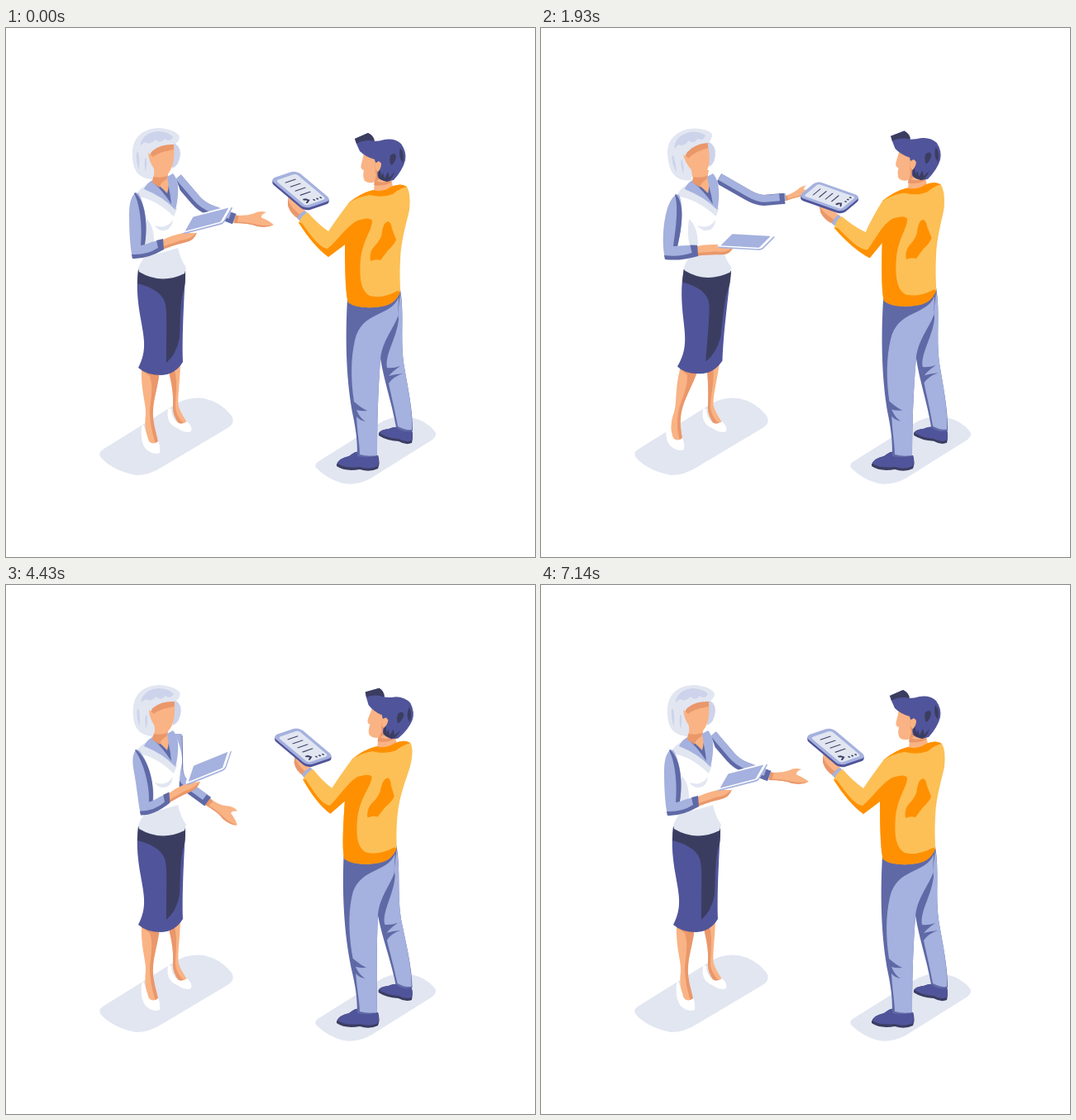
Recreate the animation shown at these times as an HTML page with a canvas. Size 640 by 640 pixels, loop 7210 ms.

```html
<!DOCTYPE html>
<html lang="en">
<head>
<meta charset="utf-8">
<title>Handing over a tablet</title>
<style>
  html, body { margin: 0; width: 100%; height: 100%; overflow: hidden; background: #fff; }
  canvas { display: block; width: 640px; height: 640px; }
</style>
</head>
<body>
<canvas id="stage"></canvas>
<script>
const LOOP = 7210, FRAMES = 101;
const indigo = '#50549a', navy = '#3b3d60', mid = '#5f69a6', lavender = '#a5b1de', pale = '#e1e6f1',
  mist = '#cdd3ea', skin = '#f9b384', blush = '#ea976a', gold = '#fcc056', orange = '#ff9002', white = '#fff';

const canvas = document.getElementById('stage'), ctx = canvas.getContext('2d');
const ratio = window.devicePixelRatio || 1;
canvas.width = canvas.height = 640 * ratio;

/* ---------- helpers ---------- */

const clamp = (v) => Math.min(1, Math.max(0, v));
const mix = (a, b, k) => a + (b - a) * k;
// Linear from a to b while v runs from lo to hi, constant outside.
const span = (v, lo, hi, a, b) => mix(a, b, clamp((v - lo) / (hi - lo)));
const ramp = (t, from, to) => { const s = clamp((t - from) / (to - from)); return s * s * (3 - 2 * s); };
const bump = (t, from, peak, to) => ramp(t, from, peak) - ramp(t, peak, to);
// Smooth blend through three values at k = -1, 0 and 1.
const through = (low, rest, high, k) => rest + k * (high - low) / 2 + k * k * ((high + low) / 2 - rest);

// Moves every point of a path by shift(x, y) => [dx, dy].
const bend = (path, shift) => path.replace(/([\d.]+) ([\d.]+)/g, (_, x, y) => {
  const [dx, dy] = shift(+x, +y);
  return (+x + dx).toFixed(2) + ' ' + (+y + dy).toFixed(2);
});

function paint(color, path, shift) {
  ctx.fillStyle = color;
  ctx.fill(new Path2D(shift ? bend(path, shift) : path));
}

function within(change, draw) {
  ctx.save(); change(); draw(); ctx.restore();
}

function turned(x, y, dx, dy, degrees, draw) {
  within(() => {
    ctx.translate(x + dx, y + dy);
    ctx.rotate(degrees * Math.PI / 180);
    ctx.translate(-x, -y);
  }, draw);
}

// Maps a 100 x 60 plane to the corners a (origin), b (end of x), c (opposite a).
function onPlane([ax, ay, bx, by, cx, cy], ox, oy, draw) {
  within(() => ctx.transform((bx - ax) / 100, (by - ay) / 100, (cx - bx) / 60, (cy - by) / 60, ax + ox, ay + oy), draw);
}

function roundBox(color, x, y, w, h, r) {
  ctx.fillStyle = color;
  ctx.beginPath();
  ctx.roundRect(x, y, w, h, r);
  ctx.fill();
}

/* ---------- woman ---------- */

function strokeLimb(color, width, dx, dy, [sx, sy, ex, ey, wx, wy]) {
  const nx = mix(sx, ex, .75), ny = mix(sy, ey, .75), fx = mix(ex, wx, .3), fy = mix(ey, wy, .3);
  within(() => ctx.translate(dx, dy), () => {
    ctx.strokeStyle = color;
    ctx.lineWidth = width;
    ctx.stroke(new Path2D(`M${sx} ${sy}L${nx} ${ny}Q${ex} ${ey} ${fx} ${fy}L${wx} ${wy}`));
  });
}

// reach: -1 hanging low, 0 open palm, 1 stretched out
function drawReach(reach, lean) {
  const ex = through(208, 237, 265, reach), ey = through(236, 217, 209, reach);
  const wx = through(244, 276, 296, reach), wy = through(262, 231, 204, reach);
  const tx = through(281, 324, 330, reach), ty = through(289, 236, 192, reach);
  const arm = [207 + 8 * lean, 182, ex, ey, wx, wy];
  within(() => {
    ctx.translate(wx, wy);
    ctx.rotate(Math.atan2(ty - wy, tx - wx));
    ctx.scale(Math.hypot(tx - wx, ty - wy) / 47, 1 - .4 * clamp(reach));
  }, () => {
    paint(skin, 'M0 -5Q12 -4 22 -9Q30 -14 37 -12Q30 -8 32 -5Q42 -2 47 2Q40 7 28 6Q18 3 0 5Z');
    paint(blush, 'M0 -5L5 -4L4 3Q18 2 28 4Q40 5 47 2Q40 7 28 6Q18 3 0 5Z');
  });
  strokeLimb(mid, 13, 0, 0, arm);
  strokeLimb(lavender, 8.5, 1.4, -2, arm);
  const len = Math.hypot(wx - ex, wy - ey) / 6;
  ctx.strokeStyle = mid;
  ctx.lineWidth = 12.5;
  ctx.stroke(new Path2D(`M${wx - (wx - ex) / len} ${wy - (wy - ey) / len}L${wx} ${wy}`));
}

function drawLadyHead() {
  paint(mist, 'M200 138Q211 141 211 152Q210 166 201 170Z');
  paint(skin, 'M173 150Q180 142 203 141C204 155 203 167 197 175Q190 183 179 179Z');
  paint(blush, 'M174 163Q176 151 203 147L203 140Q180 141 172 152Z');
  paint(pale, 'M177 183C160 182 152 172 153 150C154 130 168 121 186 121Q205 123 210 131Q210 138 203 141Q188 140 178 148Q172 152 176 160Q180 170 179 178Z');
  paint(mist, 'M163 139Q168 126 184 125Q198 126 202 132Q198 139 192 134Q186 141 181 135Q174 142 168 138L163 142Z');
  paint(mist, 'M158 151Q157 162 161 171Q162 160 160 150Z');
  paint(mist, 'M168 158Q167 168 169 174Q171 166 170 157Z');
  paint(skin, 'M172 151Q173 162 179 170L183 160Z');
}

function drawLadyTablet(lean, lift) {
  const at = (rest, leant, lifted) => rest + (leant - rest) * lean + (lifted - rest) * lift;
  const pad = [at(213, 213, 222), at(250, 266, 236), at(263, 267, 268), at(237, 269, 210), at(275, 284, 272), at(216, 252, 183)];
  onPlane(pad, 0, 0, () => roundBox(lavender, 0, 0, 100, 60, 7));
  onPlane(pad, -.9, -1.6, () => {
    roundBox(white, 0, 0, 100, 60, 7);
    roundBox(lavender, 7, 5, 86, 49, 2);
  });
}

function drawWoman(t) {
  const lean = ramp(t, 0, 1140) - ramp(t, 2000, 3700);
  const lift = ramp(t, 3790, 5070) - ramp(t, 5070, 6950);
  const reach = ramp(t, 0, 1140) - 2 * ramp(t, 1700, 3500) + 1.4 * ramp(t, 5070, 6070) - .4 * ramp(t, 6070, 7000);
  const out = clamp(reach);

  // The waist swings out most; the front foot slides back while the other stays put.
  const sway = (x, y) => {
    if (y < 295) return [lean * span(y, 182, 295, 6, 13), 0];
    if (y < 411) return [lean * span(y, 295, 411, 13, 5), -lean * 1.5];
    return x < 192 ? [lean * span(y, 411, 490, 5, -13), lean * span(y, 411, 490, -1.5, -4)]
      : [lean * span(y, 411, 440, 5, 0), 0];
  };
  // Upper arm follows the elbow, forearm runs from elbow to hand.
  const fold = (x, y) => {
    const down = span(y, 200, 248, 0, 1), along = span(x, 165, 225, 0, 1);
    return [
      mix(7 * lean + 2 * lift, mix(20 * lift - 3 * lean, 8 * lift + 2 * lean, along), down),
      mix(2 * lean, mix(lean - lift, 17 * lean - 20 * lift, along), down)];
  };
  const part = (color, path) => paint(color, path, sway);
  const sleeve = (color, path) => paint(color, path, fold);

  drawReach(reach, lean);

  part(skin, 'M196 408C199 425 203 440 202 455Q201 465 206 474Q212 481 219 477Q211 465 209 458C207 448 211 425 211 402Z');
  part(blush, 'M196 412L204 414C208 430 205 445 205 458C205 465 210 474 215 478Q209 481 206 474Q201 465 202 455C203 440 199 425 196 412Z');
  part(white, 'M196 460C194 474 198 480 207 484Q217 491 224 488Q226 482 219 476Q212 481 207 477Q200 471 200 461Z');
  part(skin, 'M164 412C163 440 170 455 169 468C167 480 170 494 172 501Q178 506 184 501C182 488 176 478 177 466C179 445 185 430 186 412Z');
  part(blush, 'M164 414L186 412C185 430 179 445 178 462C177 476 182 490 184 501L181 503C176 488 174 474 174 462C176 445 178 432 174 421Z');
  part(white, 'M165 479C162 490 164 505 170 510Q178 517 186 514Q187 506 184 500Q178 505 173 500C170 492 169 484 165 479Z');

  part(indigo, 'M160 292C157 315 160 335 163 352C167 375 171 390 160 411Q170 420 188 420Q205 419 214 404C213 370 215 340 217 294Z');
  part(navy, 'M160 292L217 294C217 305 217 312 215 316C211 330 211 350 210 375Q206 395 194 405C194 370 195 345 193 335Q190 317 159 309Z');
  part(white, 'M158 200Q170 188 178 183L203 177Q214 200 213 215Q208 235 210 267L168 279Q172 250 158 200Z');
  part(pale, 'M160 291Q163 282 169 276Q190 272 208 266Q211 280 218 290L216 297Q188 311 161 295Z');
  part(pale, 'M170 231Q180 240 179 262L169 264Q166 250 170 231Z');
  part(pale, 'M180 239Q194 244 202 232Q200 246 188 245Q182 243 180 239Z');
  part(pale, 'M168 191Q158 197 158 204Q180 206 203 228L207 218Q188 200 168 191Z');
  part(lavender, 'M177 184Q169 189 167 195Q190 204 205 220Q209 205 208 190Q206 180 202 176L193 181Z');
  part(mid, 'M177 186Q190 197 200 213Q198 192 193 182Z');
  part(skin, 'M179 170L177 186Q186 190 195 200Q198 190 195 182L197 172Z');
  part(blush, 'M178 180Q190 182 196 178L194 183Q186 188 186 193L177 187Z');
  turned(186, 183, lean * (10 - 6 * out) + 10 * out * (1 - lean) + 1.5 * lift, 0, -9 * lean * out, drawLadyHead);

  sleeve(skin, 'M188 257Q200 251 214 248L231 248Q226 257 215 259Q205 262 190 267Z');
  sleeve(blush, 'M188 265Q203 260 211 257Q224 256 231 247Q228 258 215 260Q205 262 190 268Z');
  sleeve(lavender, 'M157 199Q149 205 149 225C149 245 150 265 153 278Q170 279 190 268L189 256Q178 258 168 262C171 245 170 215 160 200Z');
  sleeve(mid, 'M156 199C171 212 171 245 168 262L163 263C165 245 163 215 155 200Z');
  sleeve(mid, 'M152 274Q170 275 184 266L182 257L190 255L191 268Q170 280 153 279Z');
  drawLadyTablet(lean, lift);
}

/* ---------- man ---------- */

const legs = 'M413 328C410 380 412 430 420 470C424 490 425 500 425 518Q437 521 449 517C449 480 450 440 453 400C458 430 466 450 472 483Q481 491 492 487C492 460 486 435 481 405C477 375 482 345 477 316Z';
const frontLight = 'M475 326C465 350 430 342 422 378C417 400 417 425 421 452Q430 460 437 463Q430 464 424 462Q428 472 435 476Q428 475 424 470C425 490 428 505 428 516Q438 519 449 517C449 480 450 440 453 402C454 380 470 362 474 349Z';
const backLight = 'M477 320C482 345 477 375 481 405C486 435 492 460 491 486Q483 487 474 482C470 460 466 445 463 430Q468 422 480 418Q470 419 463 421Q468 415 477 409Q468 412 461 411C458 395 473 375 475 352L474 346Z';

function drawManHead() {
  paint(skin, 'M433 150C432 160 428 167 430 170Q431 172 433 172Q431 180 434 185Q440 189 446 186L452 182L458 160Z');
  paint(blush, 'M447 160Q446 172 448 178L446 186Q452 184 455 178Z');
  paint(indigo, 'M422 134L438 127Q444 130 445 137Q452 137 458 135Q470 133 478 140Q485 150 483 160Q480 172 469 184Q457 188 450 181Q448 174 452 169Q454 163 451 161Q447 166 446 159Q435 156 428 149Q424 141 422 134Z');
  paint(navy, 'M422 134L438 127Q445 130 446 137Q434 134 424 140Z');
  paint(navy, 'M465 154Q471 149 472 156Q470 164 466 166Q463 160 465 154Z');
  paint(navy, 'M477 145Q483 152 480 163Q474 156 477 145Z');
  paint(navy, 'M452 170Q448 180 453 183L461 186Q467 184 470 174L464 181L462 174L458 182L456 175L454 179Z');
  paint(skin, 'M447 164Q451 159 454 164Q454 170 450 174Q446 172 447 164Z');
}

function drawManTablet(handing, sway, rise) {
  const x = (rest, handed) => mix(rest, handed, handing) - 4.5 * sway;
  const y = (rest, handed) => mix(rest, handed, handing) - 2 * rise;
  const corners = [x(319, 304), y(183, 222), x(362, 366), y(219, 226), x(394, 381), y(208, 200)];
  for (const drop of [3, 1.5]) onPlane(corners, 0, drop, () => roundBox(indigo, 0, 0, 100, 60, 12));
  onPlane(corners, 0, 0, () => {
    roundBox(lavender, 0, 0, 100, 60, 12);
    roundBox(pale, 8, 7, 85, 46, 6);
    for (let i = 0; i < 4; i++) roundBox(navy, 20 + 14 * i, 18, 2.2, 24, 1);
    for (let i = 0; i < 3; i++) roundBox(navy, 83, 30 + 7.5 * i, 5, 3.5, 2);
    paint(navy, 'M74 15L78 14L81 20L87 12L88 15L82 25L75 21Z');
  });
}

function drawMan(t) {
  const handing = ramp(t, 500, 1140) - ramp(t, 1500, 2400);
  const back = bump(t, 0, 800, 1140) + bump(t, 3450, 4250, 4800);
  const forward = bump(t, 4250, 5070, 5950);
  const nod = bump(t, 2300, 2790, 3250);
  const tipping = forward - back, sway = tipping + .3 * handing, rise = forward + .8 * handing;

  // Hips swing against the shoulders, feet stay; the forearm turns at the elbow.
  const pose = (x, y) => {
    const h = clamp((525 - y) / 330), arm = y < 290 ? span(x, 425, 390, 0, 1) : 0;
    const turn = .28 * handing;
    return [
      sway * h * h * (59 - 66 * h) + arm * (7 * handing + turn * (y - 256) - 9 * tipping),
      -6 * rise * h + arm * (6 * handing - turn * (x - 390) + 3 * forward)];
  };
  const part = (color, path) => paint(color, path, pose);

  part(navy, 'M400 528Q402 521 415 518Q423 512 426 513L428 517Q440 520 450 517Q453 526 450 533Q440 538 428 534Q410 537 400 530Z');
  part(indigo, 'M401 527Q402 521 415 518Q423 512 426 513L428 517Q440 520 450 517Q452 524 450 530Q440 535 428 531Q410 533 401 527Z');
  part(navy, 'M451 490Q453 486 463 485Q471 482 474 483Q483 488 491 487Q493 494 491 502Q484 505 475 500Q460 499 451 493Z');
  part(indigo, 'M452 490Q453 486 463 485Q471 482 474 483Q483 488 491 487Q493 493 491 499Q484 502 475 497Q460 496 452 490Z');
  part(mid, legs);
  part(lavender, backLight);
  part(lavender, frontLight);

  part(skin, 'M447 178L445 197Q456 203 468 192L465 178Z');
  part(blush, 'M446 184Q455 190 466 183L466 187Q456 192 445 190Z');
  part(skin, 'M341 205Q347 206 354 213L363 222L354 231Q345 225 342 216Z');
  part(blush, 'M341 207Q344 217 356 226L354 231Q344 225 341 215Z');
  part(lavender, 'M352 230Q356 223 362 221L365 225Q358 228 356 234Z');
  part(gold, 'M444 196Q456 199 466 192Q478 187 485 192Q490 200 488 220C485 235 478 255 477 280C476 300 477 308 477 319Q470 336 445 338Q425 339 414 332Q410 322 410 262L390 277Q372 264 354 236Q357 227 365 223Q376 236 390 246Q400 231 415 211Q430 199 444 196Z');
  part(orange, 'M354 235L358 236C370 253 380 266 389 267C400 258 412 240 425 233Q440 228 443 233C443 245 432 255 429 280C427 305 430 318 440 324Q455 328 474 318L477 319Q472 334 455 337Q425 341 414 332Q410 322 410 262L390 277Q372 264 354 235Z');
  part(orange, 'M413 213Q428 200 444 196Q456 199 466 192Q478 187 485 192Q476 194 468 201Q455 206 440 202Q425 204 413 213Z');
  part(orange, 'M462 234Q466 235 467 243L472 256Q470 262 462 269L453 281Q447 279 441 282Q439 272 445 265Q455 255 455 246Q457 235 462 234Z');

  const tilt = 4.5 * handing + 12 * back - 11 * forward - 5.5 * nod;
  turned(455, 190, -7.5 * sway, -4.5 * rise, tilt, drawManHead);
  drawManTablet(handing, tipping, forward);
}

/* ---------- scene ---------- */

function drawScene(t) {
  ctx.setTransform(ratio, 0, 0, ratio, 0, 0);
  ctx.fillStyle = white;
  ctx.fillRect(0, 0, 640, 640);
  ctx.lineJoin = 'round';
  paint(pale, 'M117 510L207 454Q222 446 239 448Q259 452 272 468Q279 477 268 484L189 531Q174 541 157 541Q131 536 116 521Q110 515 117 510Z');
  paint(pale, 'M377 525L452 478Q470 467 490 471Q508 475 518 487Q523 492 516 498L441 545Q424 554 408 551Q389 546 376 533Q372 529 377 525Z');
  drawWoman(t);
  drawMan(t);
}

const start = performance.now();
function tick() {
  const progress = ((performance.now() - start) % LOOP) / LOOP;
  // The small bias absorbs times rounded down to 10 ms.
  drawScene(Math.floor(progress * FRAMES + .1) % FRAMES * LOOP / FRAMES);
  requestAnimationFrame(tick);
}
tick();
</script>
</body>
</html>
```
